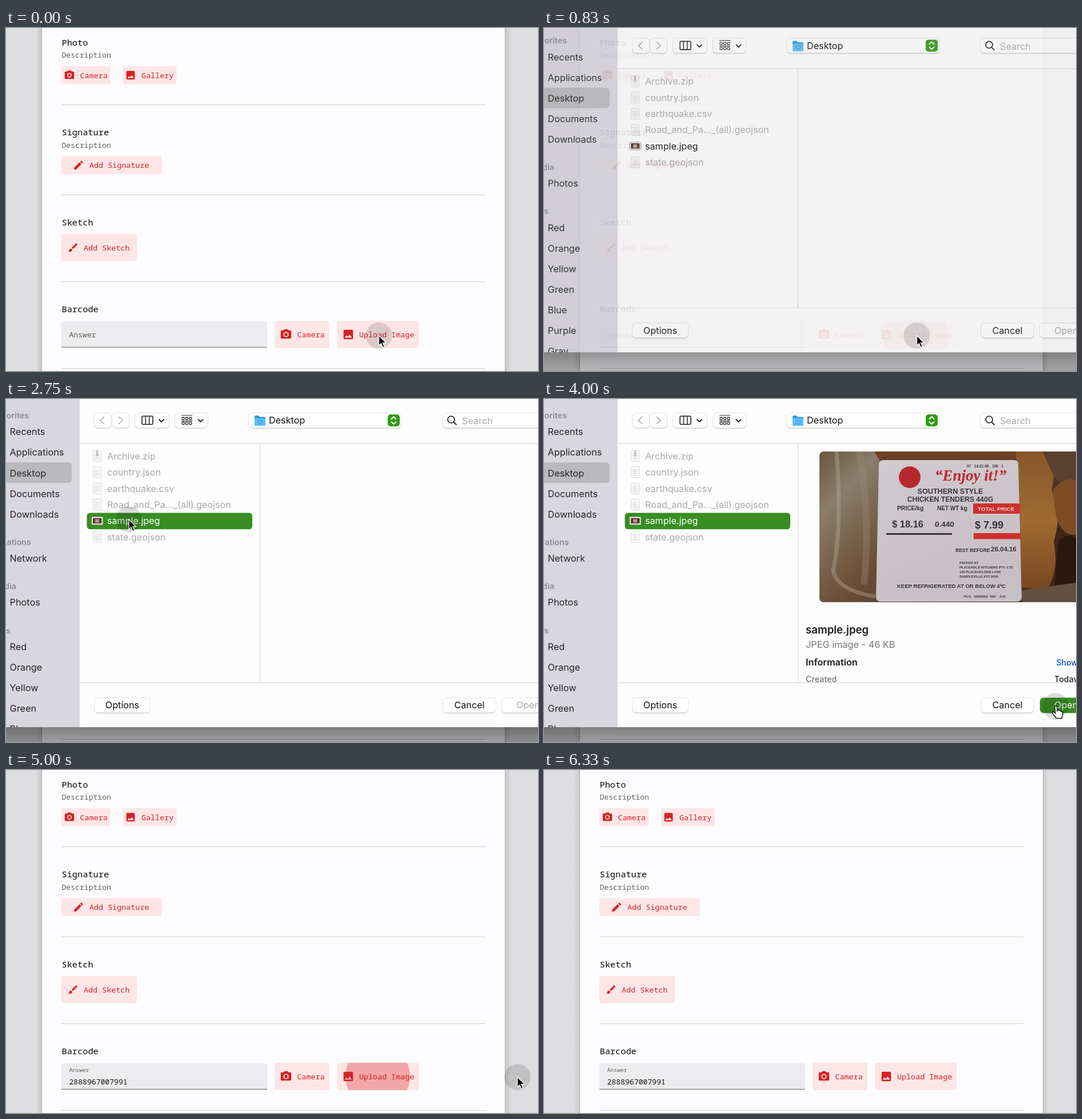
An HTML page for the animation above (6910 ms loop, 931 by 601 pixels).

```html
<!DOCTYPE html>
<html lang="en">
<head>
<meta charset="utf-8">
<title>Barcode from image</title>
<style>
html, body { margin: 0; width: 100%; height: 100%; overflow: hidden; background: #dedee0; }
svg { display: block; width: 931px; height: 601px; }
text { font-family: Inter, sans-serif; white-space: pre; }
.mono { font-family: "Noto Sans Mono", monospace; }
.label { font-family: "Liberation Sans", Arial, sans-serif; font-weight: bold; }
.slogan { font-family: "Liberation Serif", serif; font-weight: bold; font-style: italic; }
</style>
</head>
<body>
<svg id="stage" viewBox="0 0 931 601"></svg>
<script>
const LOOP = 6910, STEP = 1000 / 12;
const RED = '#d32323', GREEN = '#388e22', MUTED = '#a9a9a9';

// Drawing helpers; text is placed by the middle of its capitals.
const text = (x, y, size, str, fill = '#111', attrs = '') =>
  `<text x="${x}" y="${y + size * 0.36}" font-size="${size}" fill="${fill}" ${attrs}>${str}</text>`;
const mono = (x, y, size, str, fill, attrs = '') => text(x, y, size, str, fill, 'class="mono" ' + attrs);
const rect = (x, y, w, h, fill, r = 0, attrs = '') =>
  `<rect x="${x}" y="${y}" width="${w}" height="${h}" rx="${r}" fill="${fill}" ${attrs}/>`;
const line = (d, stroke, width = 1, attrs = '') =>
  `<path d="${d}" fill="none" stroke="${stroke}" stroke-width="${width}" ${attrs}/>`;
const control = (x, y, w, h = 27) =>
  rect(x + .5, y + 1, w - 1, h, '#d0d0d2', 6.5) + rect(x + .5, y + .5, w - 1, h - 1, '#fff', 6.5, 'stroke="#e2e2e4"');
const chevron = (x, y) => line(`M${x - 4} ${y - 2}l4 4 4-4`, '#222', 1.9, 'stroke-linecap="round"');

const ICONS = {
  camera: 'M9 2L7.17 4H4c-1.1 0-2 .9-2 2v12c0 1.1.9 2 2 2h16c1.1 0 2-.9 2-2V6c0-1.1-.9-2-2-2h-3.17L15 2H9zm3 15c-2.76 0-5-2.24-5-5s2.24-5 5-5 5 2.24 5 5-2.24 5-5 5zM12 8.8a3.2 3.2 0 1 0 0 6.4 3.2 3.2 0 0 0 0-6.4z',
  image: 'M21 19V5c0-1.1-.9-2-2-2H5c-1.1 0-2 .9-2 2v14c0 1.1.9 2 2 2h14c1.1 0 2-.9 2-2zM8.5 13.5l2.5 3.01L14.5 12l4.5 6H5l3.5-4.5z',
  pencil: 'M3 17.25V21h3.75L17.81 9.94l-3.75-3.75L3 17.25zM20.71 7.04c.39-.39.39-1.02 0-1.41l-2.34-2.34c-.39-.39-1.02-.39-1.41 0l-1.83 1.83 3.75 3.75 1.83-1.83z',
  brush: 'M7 14c-1.66 0-3 1.34-3 3 0 1.31-1.16 2-2 2 .92 1.22 2.49 2 4 2 2.21 0 4-1.79 4-4 0-1.66-1.34-3-3-3zm13.71-9.37l-1.34-1.34c-.39-.39-1.02-.39-1.41 0L9 12.25 11.75 15l8.96-8.96c.39-.39.39-1.02 0-1.41z'
};
const icon = (name, cx, cy, scale) =>
  `<path d="${ICONS[name]}" fill="${RED}" fill-rule="evenodd" transform="translate(${cx - 12 * scale} ${cy - 12 * scale}) scale(${scale})"/>`;
const button = (x, y, w, h, name, iconX, scale, textX, label, under = '') =>
  rect(x, y, w, h, '#fee6e6', 4) + under +
  icon(name, iconX, y + h / 2, scale) + mono(textX, y + h / 2, 13.4, label, RED);

const page = () => rect(0, 0, 931, 601, '#dedee0') +
  rect(52, 0, 832, 601, 'url(#cardShadow)') +
  rect(62.5, -5, 811, 620, '#fcfcfe', 0, 'stroke="#b0b0aa"') +
  ['Photo', 'Signature', 'Sketch', 'Barcode'].map((s, i) => mono(97.5, [25, 182, 340, 492][i], 15.3, s, '#0a0a0a')).join('') +
  [47, 205].map(y => mono(97.5, y, 13.1, 'Description', '#62625c')).join('') +
  [134.5, 292.5, 444.5, 596.5].map(y => line(`M97 ${y}H839`, '#cfcfd0')).join('') +
  button(97, 67, 86, 31.5, 'camera', 111, .82, 129.5, 'Camera') +
  button(205, 67, 93.5, 31.5, 'image', 218, .82, 237, 'Gallery') +
  button(97, 224.5, 176, 31.5, 'pencil', 127, .86, 146, 'Add Signature') +
  button(97, 361, 132, 47.5, 'brush', 117.5, .82, 136, 'Add Sketch') +
  `<path d="M97 559V518q0-4 4-4H453q4 0 4 4V559z" fill="#ececee"/>` + line('M97 559.3H457', '#808080', 1.3) +
  mono(110.5, 537, 13.1, 'Answer', '#5c5c52', 'id="answerLabel"') +
  mono(110.5, 546, 13.1, '2888967007991', '#111', 'id="answerValue"') +
  button(470, 513, 96, 48, 'camera', 490, .92, 509.5, 'Camera') +
  button(579, 513, 143, 48, 'image', 599, .92, 618, 'Upload Image',
    `<circle id="ripple" cx="650.5" cy="537" fill="${RED}" clip-path="url(#uploadClip)"/>`);

const heading = (x, y, s) => text(x, y, 14.2, s, '#8f8d94', 'font-weight="600" text-anchor="end"');
const items = (y, ...names) => names.map((s, i) => text(6.5, y + i * 36.1, 16.3, s, '#252528')).join('');

const sidebar = () => rect(0, -60, 128, 635, '#d9d7de') + line('M128.5 -60V575', '#e0e0e2') +
  rect(-8, 111, 123, 36, '#bab9bb', 6) +
  heading(40, 29, 'Favorites') + items(57.5, 'Recents', 'Applications', 'Desktop', 'Documents', 'Downloads') +
  `<g id="locations">${heading(43.5, 250.5, 'Locations')}${items(279.5, 'Network')}</g><g id="lowerGroups">` +
  heading(18, 328, 'Media') + items(356.5, 'Photos') + heading(8, 405.5, 'Tags') +
  items(434, 'Red', 'Orange', 'Yellow', 'Green', 'Blue', 'Purple', 'Gray') + '</g>';

const gridIcon = () => [0, 1].map(r => [0, 1, 2].map(c =>
  rect(308 + c * 6.4, 32 + r * 8.5, 4, 4, 'none', .8, 'stroke="#333" stroke-width="1.3"')).join('')).join('') +
  line('M307 28.500H326M307 38.300H326', '#333', 1.2);

const toolbar = () => control(154, 24, 31) + control(185, 24, 31) +
  line('M172 31l-7 6.500 7 6.500M197 31l7 6.500-7 6.500', '#ababad', 1.6) +
  control(225, 24, 61) + rect(238, 30, 19, 14.5, 'none', 2, 'stroke="#222" stroke-width="1.6"') +
  line('M244.300 30V44.500M250.700 30V44.500', '#222', 1.5) + chevron(272, 38) +
  control(295, 24, 59) + gridIcon() + chevron(340.5, 38) +
  control(424, 24, 268) +
  `<path d="M435 31q0-2 2-2h5l2 2.500h8q2 0 2 2V45q0 2-2 2H437q-2 0-2-2z" fill="#2f9ce0"/>` +
  rect(435, 34, 19, 13, '#5fc0f5', 2) + rect(440.5, 38, 8, 5.5, 'none', 1, 'stroke="#2f8ed0"') +
  text(460, 37.5, 16.2, 'Desktop') +
  rect(668, 27, 21, 21, '#339a16', 5) +
  line('M674.500 35l4-4 4 4M674.500 40l4 4 4-4', '#fff', 1.9, 'stroke-linecap="round"') +
  control(763, 24, 200) + `<circle cx="779" cy="36" r="6" fill="none" stroke="#222" stroke-width="1.7"/>` +
  line('M783.500 40.500l5 5', '#222', 1.8) + text(798, 38.5, 16.2, 'Search', MUTED) +
  line('M129 78H931M444.500 78V497M129 497H931', '#e0e0dc', 1.4);

const fileIcon = y => rect(152.5, y - 9.5, 14, 19, '#fafafa', 1, 'stroke="#d8d8d8"') +
  [-4, -1, 2, 5].map(d => line(`M155 ${y + d}h9`, '#d0d0d0')).join('');
const files = () => ['Archive.zip', 'country.json', 'earthquake.csv', 'Road_and_Pa..._(all).geojson', 'sample.jpeg', 'state.geojson']
  .map((name, i) => {
    const y = 100 + i * 28.4;
    if (i === 4) return rect(141.5, 199.5, 289.5, 28.8, GREEN, 5.5, 'id="selection"') +
      rect(150, y - 7, 19.5, 13.5, '#fff', 1, 'stroke="#999"') + rect(152, y - 5, 15.5, 9.5, '#5d3328') +
      rect(156, y - 3, 7, 6, '#b09a92') + text(177, y, 16.1, name, '#111', 'id="sampleName"');
    return fileIcon(y) + (i ? '' : line('M159.500 91v9', '#888', 2.5, 'stroke-dasharray="1.500 1"')) + text(177, y, 16.1, name, MUTED);
  }).join('');

const label = (x, y, size, str, fill = '#38343a', attrs = '') => text(x, y, size, str, fill, 'class="label" ' + attrs);
const photo = () => `<g clip-path="url(#photoClip)">` + rect(482, 92, 460, 264, 'url(#tray)') +
  `<path d="M578 92H931V160L880 130 830 200 590 112z" fill="#6b4022"/>
   <path d="M826 92H872Q900 118 888 160 908 200 892 250 902 300 880 335L836 330z" fill="url(#crumb)"/>
   <path d="M872 92H931V150Q905 160 890 130z" fill="#59402f"/>
   <path d="M890 160Q910 135 931 142V238Q905 240 896 205z" fill="#7d4b24"/>
   <path d="M900 250Q916 232 931 244V325L893 330z" fill="#2c170f"/>
   <path d="M836 335L931 322V356H836z" fill="#65503f"/>
   <path d="M512 92Q522 230 506 300 512 335 580 346" fill="none" stroke="#b5aa9b" stroke-width="7" opacity=".4"/>
   <path d="M552 92Q572 210 560 325" fill="none" stroke="#9a8b76" stroke-width="12" opacity=".35"/>
   <path d="M595 107H822Q830 107 830 115L836 347Q836 355 828 355H589Q581 355 581 347L586 115Q586 107 595 107z" fill="url(#paper)"/>
   <circle cx="640" cy="137" r="19" fill="#b8282f"/>` +
  text(684, 133, 27, '“Enjoy it!”', '#c1232f', 'class="slogan"') +
  label(740, 118, 6.5, '07   14:21:06   106   1') +
  label(711, 161, 12.6, 'SOUTHERN STYLE', '#38343a', 'text-anchor="middle"') +
  label(711, 175.5, 12.2, 'CHICKEN TENDERS 440G', '#38343a', 'text-anchor="middle"') +
  label(618, 191.5, 10.3, 'PRICE/kg') + label(688, 191.5, 10, 'NET WT kg') +
  rect(751, 183, 82, 18, '#cf2f2f') + label(759, 192, 9.8, 'TOTAL PRICE', '#ecd0d0') +
  label(609, 219, 16.5, '$ 18.16') + label(684, 219, 13.5, '0.440') + label(754, 221, 18, '$ 7.99') +
  rect(599, 235, 115, 3, '#38343a') + rect(752, 235, 82, 10.5, '#cf2f2f') +
  label(720, 265, 8.5, 'BEST BEFORE') + label(782, 263, 11.5, '26.04.16') +
  ['PACKED BY', 'PLACEHOLD KITCHENS PTY. LTD.', '100 PLACEHOLDER LANE', 'SAMPLEVILLE XYZ 0000']
    .map((s, i) => label(727, 286.5 + i * 8, 5.8, s)).join('') +
  label(618, 328, 9.5, 'KEEP REFRIGERATED AT OR BELOW 4ºC') +
  label(735, 346, 6.2, 'PLU   0000000  460   -141') + '</g>';

const preview = () => `<g id="preview" clip-path="url(#previewClip)">` + photo() +
  text(458, 404, 18.6, 'sample.jpeg', '#1c1c1e', 'font-weight="600"') +
  text(458, 430, 16.3, 'JPEG image - 46 KB', '#77777a') +
  text(458, 461.5, 16.3, 'Information', '#1c1c1e', 'font-weight="600"') +
  text(896.5, 462, 14, 'Show More', '#0a50d8', 'font-weight="500"') +
  text(458, 490.5, 14.3, 'Created', '#77777a', 'font-weight="500"') +
  text(893, 490.5, 14.3, 'Today', '#222', 'font-weight="500"') + '</g>';

const dialog = () => rect(0, 575, 931, 26, 'url(#sheetShadow)') +
  `<g clip-path="url(#dialogClip)">` + rect(128, -60, 803, 635, '#fdfdfe') + sidebar() + toolbar() + files() + preview() +
  control(154, 523, 99) + text(203.5, 536.5, 16.2, 'Options', '#111', 'text-anchor="middle"') +
  control(764, 523, 94) + text(811, 536.5, 16.2, 'Cancel', '#111', 'text-anchor="middle"') +
  control(867, 523, 95) + rect(868, 523.5, 95, 26.5, GREEN, 6, 'id="openFill"') +
  text(893, 536.5, 16.2, 'Open', MUTED, 'id="openText"') + '</g>';

const clip = (id, shape) => `<clipPath id="${id}">${shape}</clipPath>`;
document.getElementById('stage').innerHTML = `<defs>
  <linearGradient id="cardShadow"><stop offset="0" stop-color="#dedee0"/><stop offset=".012" stop-color="#c9c9cc"/>
    <stop offset=".988" stop-color="#c9c9cc"/><stop offset="1" stop-color="#dedee0"/></linearGradient>
  <linearGradient id="sheetShadow" x2="0" y2="1"><stop offset="0" stop-opacity=".2"/><stop offset="1" stop-opacity="0"/></linearGradient>
  <linearGradient id="tray" x2=".9" y2=".5"><stop offset="0" stop-color="#6a563d"/><stop offset=".2" stop-color="#8a7d6b"/>
    <stop offset=".5" stop-color="#6d5138"/><stop offset="1" stop-color="#41261a"/></linearGradient>
  <linearGradient id="crumb" x2="0" y2="1"><stop offset="0" stop-color="#87562a"/><stop offset=".5" stop-color="#a06a33"/>
    <stop offset="1" stop-color="#774620"/></linearGradient>
  <linearGradient id="paper" x2=".4" y2="1"><stop offset="0" stop-color="#d0cbd0"/><stop offset="1" stop-color="#c6bfc4"/></linearGradient>
  ${clip('uploadClip', rect(579, 513, 143, 48, '#000', 4))}${clip('photoClip', rect(482, 92, 470, 264, '#000', 7))}
  ${clip('previewClip', rect(445, 79, 486, 417, '#000'))}${clip('dialogClip', rect(0, -60, 931, 635, '#000'))}
  </defs>${page()}${rect(0, 0, 931, 601, '#000', 0, 'id="dim"')}<g id="dialog">${dialog()}</g>
  <circle id="halo" r="23" opacity=".13"/>
  <path id="arrow" d="M0 0V17.500L4 13.800 6.800 20.500 9.700 19.300 6.900 12.700H12.500z" stroke="#fff" stroke-width="1.2"/>
  <path id="hand" d="M-1 1.500C-1-.8 2.400-.8 2.600 1.500L3.200 8.500 4 6.800C5.800 6 7 7 7.200 8.500 8.800 7.600 10 8.500 10.300 9.800 12 9.400 12.900 10.500 12.900 12.500 13 16 11.500 17.500 11 21.500H1C.5 18-3.500 15.500-5.500 12.200-6 10 -3.500 9.600-1.800 11.500L-.2 13z" fill="#fff" stroke="#111" stroke-width="1.4"/>`;

const ui = Object.fromEntries([...document.querySelectorAll('#stage > [id], #stage g [id], #stage > text[id]')].map(el => [el.id, el]));
const set = (el, attrs) => { for (const k in attrs) el.setAttribute(k, attrs[k]); };
const show = (el, on) => { el.style.display = on ? '' : 'none'; };

// Progress from 0 to 1 over a span of time, and the easings.
const span = (t, start, length) => Math.min(1, Math.max(0, (t - start) / length));
const easeOut = k => 1 - (1 - k) ** 2.2;
const easeInOut = k => (1 - Math.cos(Math.PI * k)) / 2;

// start, duration, x, y, upward bow
const MOVES = [[1670, 750, 215, 211, 0], [3000, 750, 895, 538, 0], [5020, 560, 655, 545, 13], [5680, 630, 570, 665, 0]];
function pointer(t, ease) {
  let x = 652.5, y = 539;
  for (const [start, length, toX, toY, bow] of MOVES) {
    const k = ease(span(t, start, length));
    x += (toX - x) * k;
    y += (toY - y) * k - bow * Math.sin(Math.PI * k);
  }
  return [x, y];
}

function render(t) {
  const closing = 1 - easeInOut(span(t, 4060, 340));
  const open = easeInOut(span(t, 590, 320)) * closing;
  set(ui.dim, { opacity: .37 * easeInOut(span(t, 660, 250)) * closing });
  set(ui.dialog, { opacity: open, transform: `translate(0 ${-49 * (1 - open)})` });
  const loaded = t > 900;
  show(ui.locations, loaded);
  set(ui.lowerGroups, { transform: `translate(0 ${loaded ? 0 : -77.5})` });

  const selected = t > 2490, ready = t > 2820;
  show(ui.selection, selected);
  set(ui.sampleName, { fill: selected ? '#fff' : '#111' });
  show(ui.preview, ready);
  show(ui.openFill, ready);
  set(ui.openText, { fill: ready ? '#fff' : MUTED });

  const pulse = 54.5 + 2 * Math.cos((t - 5000) / 2500 * 2 * Math.PI);
  set(ui.ripple, {
    r: t < 920 ? 57 * easeOut(span(t, 300, 580)) : pulse,
    opacity: .32 * (1 - span(t, 5250, 330))
  });

  const lift = easeInOut(span(t, 4500, 170)), size = 13.1 - 3.4 * lift;
  set(ui.answerLabel, { 'font-size': size, y: 537 - 11.5 * lift + size * .36 });
  show(ui.answerValue, t > 4570);

  const [x, y] = pointer(t, easeOut), [haloX, haloY] = pointer(t, easeInOut);
  const overOpen = x > 868 && open > .5 && t > 3000;
  const at = `translate(${x} ${y})`;
  set(ui.halo, { cx: haloX, cy: haloY });
  set(ui.arrow, { transform: at });
  set(ui.hand, { transform: at });
  show(ui.arrow, !overOpen);
  show(ui.hand, overOpen);
}

function tick() {
  const ms = performance.now() % LOOP;
  render(Math.floor((ms + 4) / STEP) * STEP);
  requestAnimationFrame(tick);
}
tick();
</script>
</body>
</html>
```
